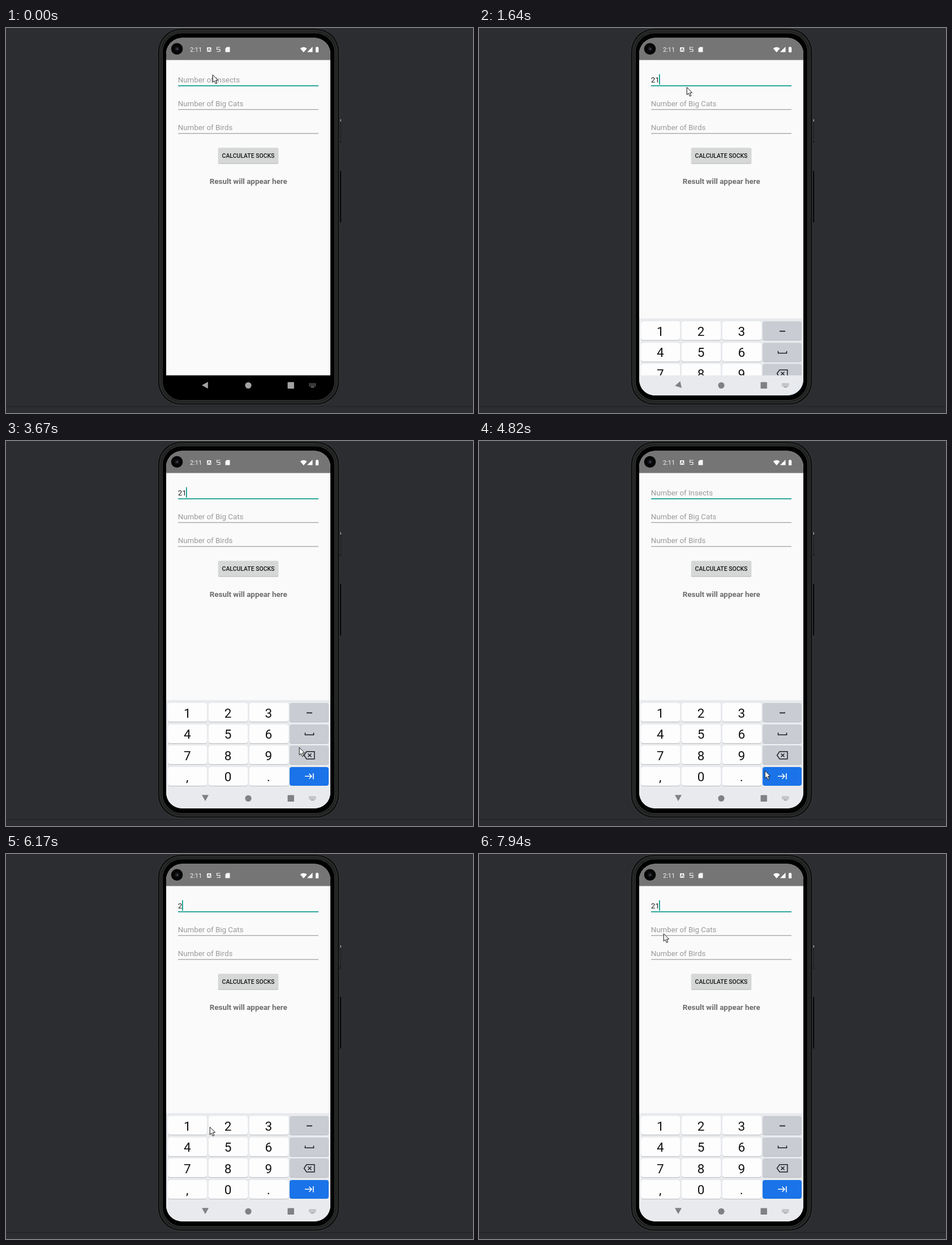
An HTML page with a canvas that plays this animation: 825x679 px, repeating every 8 s.

```html
<!DOCTYPE html>
<html lang="en">
<head>
<meta charset="utf-8">
<title>Sock calculator</title>
<style>
html, body { margin: 0; width: 100%; height: 100%; overflow: hidden; background: #2c2d31; }
canvas { display: block; width: 825px; height: 679px; }
</style>
</head>
<body>
<canvas id="stage" width="825" height="679"></canvas>
<script>
const ctx = document.getElementById('stage').getContext('2d');
const LOOP = 8000;
const TEAL = '#009688';
const BLINK = 470;
const PRESS = 160;

const pointerStart = { x: 365, y: 82 };
const glides = [
  { from: 0, to: 500, x: 369, y: 84 },
  { from: 1000, to: 1490, x: 367, y: 104 },
  { from: 2270, to: 2550, x: 409, y: 354 },
  { from: 2550, to: 3670, x: 518, y: 540 },
  { from: 4550, to: 4820, x: 505, y: 581 },
  { from: 4950, to: 5770, x: 404, y: 484 },
  { from: 6040, to: 6440, x: 324, y: 478 },
  { from: 7050, to: 7940, x: 326, y: 140 }
];
const keystrokes = [
  { key: '2', time: 1370 }, { key: '1', time: 1600 },
  { key: '<', time: 4130 }, { key: '<', time: 4250 },
  { key: '2', time: 5960 }, { key: '1', time: 6870 }
];

const progress = (t, from, to) => Math.min(1, Math.max(0, (t - from) / (to - from)));
const easeOut = p => 1 - (1 - p) ** 2;

function pointerAt(t) {
  return glides.reduce((pos, g) => {
    const p = easeOut(progress(t, g.from, g.to));
    return { x: pos.x + (g.x - pos.x) * p, y: pos.y + (g.y - pos.y) * p };
  }, pointerStart);
}

// The caret restarts its blink on every keystroke.
function inputAt(t) {
  let typed = '', pressed = '', lastEdit = -690;
  for (const { key, time } of keystrokes) {
    if (t >= time) {
      typed = key === '<' ? typed.slice(0, -1) : typed + key;
      lastEdit = time;
    } else if (t >= time - PRESS) pressed = key;
  }
  return { typed, pressed, caretOn: (t - lastEdit) % (2 * BLINK) < BLINK };
}

function rect(x, y, w, h, color) {
  ctx.fillStyle = color;
  ctx.fillRect(x, y, w, h);
}

function round(x, y, w, h, r, fill, stroke, width = 1) {
  ctx.beginPath();
  ctx.roundRect(x, y, w, h, r);
  if (fill) { ctx.fillStyle = fill; ctx.fill(); }
  if (stroke) { ctx.strokeStyle = stroke; ctx.lineWidth = width; ctx.stroke(); }
}

function circle(x, y, r, color) {
  ctx.beginPath();
  ctx.arc(x, y, r, 0, Math.PI * 2);
  ctx.fillStyle = color;
  ctx.fill();
}

function path(points, fill, stroke, width = 1, closed = true) {
  ctx.beginPath();
  points.forEach(([x, y]) => ctx.lineTo(x, y));
  if (closed) ctx.closePath();
  if (fill) { ctx.fillStyle = fill; ctx.fill(); }
  if (stroke) { ctx.strokeStyle = stroke; ctx.lineWidth = width; ctx.stroke(); }
}

function label(text, x, y, size, color, weight = 400, align = 'left') {
  ctx.font = `${weight} ${size}px Roboto, sans-serif`;
  ctx.textAlign = align;
  ctx.fillStyle = color;
  ctx.fillText(text, x, y);
}

function drawBody() {
  rect(0, 0, 825, 679, '#2c2d31');
  rect(0, 667, 825, 1, '#202125');
  rect(590, 161, 2, 41, '#0c0c0c');
  rect(590.5, 165, 1, 35, '#3a3c3d');
  rect(590.5, 161, 1.5, 4, '#aaa');
  rect(590, 252, 2, 91, '#050505');
  round(268, 0.8, 321, 664, 41, '#0b0c0c', '#3c3e3f', 1);
  round(272.5, 5, 312, 655.5, 37, null, '#272828', 4);
  round(276, 8.5, 305, 648.5, 34, '#000', '#3a3c3c', 1.5);
}

function drawStatusBar() {
  rect(283, 17, 290, 39.5, '#757575');
  circle(302, 36.7, 10.3, '#050505');
  circle(302, 36.7, 4, '#15181c');
  circle(302.5, 37, 1.2, '#5a6068');
  label('2:11', 325, 42, 11, '#f3f3f3');

  round(355, 34, 7.5, 8, 1, '#f5f5f5');
  path([[356.5, 40.5], [358.7, 36], [361, 40.5]], null, '#666', 1.1, false);
  path([[378.5, 34], [372.5, 34], [372.5, 37.7], [378, 37.7], [378, 41.5], [372.5, 41.5]], null, '#efefef', 1.2, false);
  path([[390, 33.5], [395.5, 33.5], [395.5, 42.5], [387.5, 42.5], [387.5, 36]], '#f8f8f8');

  ctx.beginPath();
  ctx.moveTo(525.7, 43);
  ctx.lineTo(519.8, 36);
  ctx.quadraticCurveTo(525.7, 31.5, 531.6, 36);
  ctx.closePath();
  ctx.fillStyle = '#fff';
  ctx.fill();
  path([[541.5, 33], [541.5, 42.5], [532, 42.5]], '#fff');
  round(547, 34, 5.2, 9, 0.8, '#fff');
  rect(548.4, 33, 2.4, 1.5, '#fff');
}

function drawForm(typed, caretOn) {
  const left = 303.7, size = 13.3;
  ['Insects', 'Big Cats', 'Birds'].forEach((name, i) => {
    const y = 96 + i * 42.2, focused = i === 0;
    if (focused && typed) label(typed, left, y, size, '#212121');
    else label('Number of ' + name, left, y, size, '#9a9a9a');
    rect(304, y + 5.1, 248, focused ? 1.6 : 1, focused ? TEAL : '#8a8a8a');
  });
  if (caretOn) {
    ctx.font = `${size}px Roboto, sans-serif`;
    rect(Math.floor(left + ctx.measureText(typed).width + 0.3), 81.5, 1.7, 18.5, TEAL);
  }

  round(374.5, 212, 107, 28, 2, 'rgba(0,0,0,.10)');
  round(375, 212, 106, 27.6, 2, 'rgba(0,0,0,.16)');
  round(375, 211.3, 106, 27.2, 1.5, '#d6d7d7');
  label('CALCULATE SOCKS', 428, 229.2, 10.45, '#141414', 500, 'center');
  label('Result will appear here', 428.3, 275, 13.4, '#6d6d6d', 700, 'center');
}

function drawKeyboard(pressed) {
  rect(283, 457, 290, 192, '#e8eaed');
  const rows = ['123-', '456_', '789<', ',0.>'];
  rows.forEach((row, r) => [...row].forEach((key, c) => {
    const x = Math.round(286 + c * 71.8), y = Math.round(462 + r * 37.6);
    const fill = key === '>' ? '#1a73e8' : c === 3 ? '#c9ccd3' : key === pressed ? '#e5e5e5' : '#fdfdfd';
    if (key !== '>') round(x, y + 1, 69, 33, 4, '#b9bcc1');
    round(x, y, 69, 33, 4, fill);
    if (c < 3) label(key, 320.2 + c * 71.8, 487.7 + r * 37.5, 22.5, '#111', 400, 'center');
  }));

  const ink = '#202124';
  rect(531, 478.6, 10, 1.8, ink);
  path([[528.5, 514.5], [528.5, 518.3], [543.5, 518.3], [543.5, 514.5]], null, ink, 1.6, false);
  path([[526.5, 554.3], [531, 547.8], [544.8, 547.8], [544.8, 560.8], [531, 560.8]], null, ink, 1.5);
  path([[533.5, 551.3], [539.5, 557.3]], null, ink, 1.5, false);
  path([[539.5, 551.3], [533.5, 557.3]], null, ink, 1.5, false);
  path([[528, 591.3], [540, 591.3]], null, '#fff', 1.6, false);
  path([[535.5, 586.8], [540, 591.3], [535.5, 595.8]], null, '#fff', 1.6, false);
  rect(542, 586, 1.6, 10.6, '#fff');
}

function drawNav(turn, light) {
  const color = light ? '#7f8184' : '#a3a3a3';
  ctx.save();
  ctx.translate(352, 630 - turn);
  ctx.rotate(-turn * Math.PI / 2);
  path([[-6, 0], [4.8, -6], [4.8, 6]], color);
  ctx.restore();
  circle(428, 630.3, 5.6, color);
  round(497.5, 624.6, 11.4, 11.4, 0.8, color);
  for (let row = 0; row < 3; row++)
    for (let col = 0; col < 6; col++)
      rect(535.5 + col * 2.1, 626.7 + row * 2, 1.2, 1.2, color);
  rect(538.5, 632.7, 6, 1.2, color);
}

function drawPointer({ x, y }) {
  ctx.save();
  ctx.translate(Math.round(x) + 0.2, Math.round(y) + 0.5);
  path([[0, 0], [0, 13.4], [3, 10.7], [5.2, 15.8], [7.5, 14.8], [5.3, 9.8], [9.3, 9.6]], '#fff', '#111', 1);
  ctx.restore();
}

function draw(t) {
  const { typed, pressed, caretOn } = inputAt(t);
  const raise = easeOut(progress(t, 1560, 1760));
  drawBody();
  ctx.save();
  ctx.beginPath();
  ctx.roundRect(283, 17.5, 290, 630.5, 28);
  ctx.clip();
  rect(283, 17, 290, 596, '#fafafa');
  drawStatusBar();
  drawForm(typed, caretOn);
  if (raise) {
    ctx.save();
    ctx.translate(0, (1 - raise) * 156);
    drawKeyboard(pressed);
    ctx.restore();
  }
  rect(283, 612.6, 290, 36, raise ? '#e8eaed' : '#000');
  drawNav(progress(t, 1600, 1910), raise > 0);
  ctx.restore();
  drawPointer(pointerAt(t));
}

const start = performance.now();
function tick(now) {
  draw(Math.max(0, now - start) % LOOP);
  requestAnimationFrame(tick);
}
draw(0);
requestAnimationFrame(tick);
</script>
</body>
</html>
```
